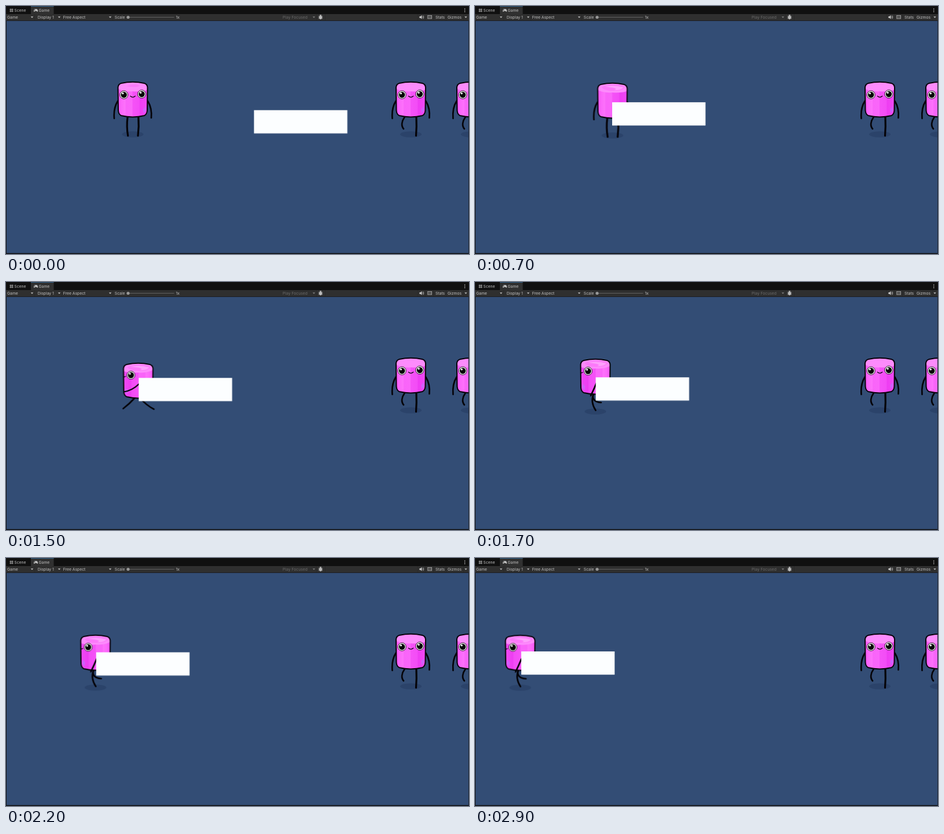
An HTML page for the animation above (3 s loop, 800 by 430 pixels).

```html
<!DOCTYPE html>
<html lang="en">
<head>
<meta charset="utf-8">
<title>Game view</title>
<style>
html, body { margin: 0; width: 100%; height: 100%; overflow: hidden; background: #101010; }
svg { display: block; }
text { font: 6.8px Inter, sans-serif; fill: #c0c0c0; }
.limb { fill: none; stroke: #050308; stroke-width: 3.2; stroke-linecap: round; stroke-linejoin: round; }
.thin { stroke-width: 2.7; }
.walker, .pose, .card { animation: 3s step-end infinite; }
.pose { visibility: hidden; }
.walker { animation-name: walk; }
.card { animation-name: follow; }
.front { animation-name: front; }
.back { animation-name: back; }
.stride { animation-name: stride; }
.pass { animation-name: pass; }

@keyframes walk {
  0% { transform: translate(219px, 131px); }
  3.32% { transform: translate(237.5px, 133px); }
  49.99% { transform: translate(228.5px, 133px); animation-timing-function: steps(4); }
  63.32% { transform: translate(187.5px, 133px); animation-timing-function: steps(6); }
  83.32% { transform: translate(121.7px, 133.2px); animation-timing-function: steps(5); }
  100% { transform: translate(67.2px, 133.4px); }
}
@keyframes follow {
  0% { transform: translate(428.5px, 180.6px); }
  3.32% { transform: translate(237px, 166.9px); }
  49.99% { transform: translate(229.4px, 166.3px); animation-timing-function: steps(4); }
  63.32% { transform: translate(187.9px, 164.3px); animation-timing-function: steps(6); }
  83.32% { transform: translate(123.8px, 162.7px); animation-timing-function: steps(5); }
  100% { transform: translate(69px, 161.8px); }
}
@keyframes front {
  0% { visibility: visible; }
  3.32%, 100% { visibility: hidden; }
}
@keyframes back {
  0%, 49.99%, 100% { visibility: hidden; }
  3.32% { visibility: visible; }
}
@keyframes stride {
  0%, 56.66%, 73.32%, 89.99%, 100% { visibility: hidden; }
  49.99%, 66.66%, 83.32% { visibility: visible; }
}
@keyframes pass {
  0%, 49.99%, 66.66%, 83.32% { visibility: hidden; }
  56.66%, 73.32%, 89.99%, 100% { visibility: visible; }
}
</style>
</head>
<body>
<svg width="800" height="430" viewBox="0 0 800 430">
  <defs>
    <linearGradient id="skin">
      <stop offset="0" stop-color="#f553f6"/>
      <stop offset=".1" stop-color="#fb66fa"/>
      <stop offset=".24" stop-color="#fd72fb"/>
      <stop offset=".27" stop-color="#f964f9"/>
      <stop offset=".48" stop-color="#fa66fa"/>
      <stop offset=".5" stop-color="#f552f7"/>
      <stop offset=".72" stop-color="#f34cf6"/>
      <stop offset=".75" stop-color="#ee3df2"/>
      <stop offset="1" stop-color="#f04af4"/>
    </linearGradient>
    <path id="shape" d="M-25.5 10Q-25 4.5-20 3Q0-1.5 20 3Q25 4.5 25.5 10L25 50Q24.5 57 20 59Q0 64-20 59Q-24.5 57-25 50Z"/>
    <clipPath id="inside"><use href="#shape"/></clipPath>
    <ellipse id="shade" cy="91.5" rx="18.5" ry="5.2" fill="#2b436a"/>
    <g id="trunk">
      <use href="#shape" fill="url(#skin)"/>
      <g clip-path="url(#inside)">
        <path d="M-26 0H26V14Q18 18 0 17Q-18 18-26 12Z" fill="#fd8bfc"/>
        <path d="M18 48L22 43L23 50L19 55Z" fill="#cf62fb"/>
      </g>
      <use href="#shape" fill="none" stroke="#08030b" stroke-width="2"/>
    </g>
    <g id="lid">
      <path d="M-19 8Q-9 3 6 3.5Q20 4 21 8Q18 14 2 14Q-14 14-19 8Z" fill="#fc79fa"/>
      <path d="M-13 7Q2 3 19 8Q16 13 3 13Q13 9-13 7Z" fill="#fda0fc"/>
    </g>
    <g id="eye">
      <circle r="7" fill="#fff" stroke="#12050f" stroke-width=".9"/>
      <circle r="5.2" fill="#040304"/>
      <circle cx="-1.8" cy="-2.4" r="1.6" fill="#fff"/>
    </g>
    <g id="face">
      <use href="#trunk"/>
      <use href="#eye" x="-15.3" y="23"/>
      <use href="#eye" x="15.5" y="21.7"/>
      <path class="limb" style="stroke-width:1.3" d="M-4 25.3Q0 29 4.2 25.2"/>
    </g>
    <g id="arms" class="limb thin">
      <path d="M-26 34Q-33.5 46-32 64"/>
      <path d="M26 34Q33.5 46 32 63"/>
    </g>
    <g id="legs" class="limb">
      <path d="M-9 62Q-11 78-8.3 94"/>
      <path d="M9.8 62Q11 78 9 94"/>
    </g>
    <g id="profile">
      <use href="#trunk" transform="matrix(-1 0 0 1 0 0)"/>
      <use href="#lid"/>
      <use href="#eye" x="-12.6" y="21.5"/>
      <path class="limb" style="stroke-width:1.3" d="M-25 24.5Q-23 25-22 23.5"/>
    </g>
    <g id="idler">
      <use href="#shade"/>
      <use href="#arms"/>
      <path class="limb thin" d="M-11 62C-16 69-17 77-12.5 82"/>
      <path class="limb" d="M9.5 62Q10.3 78 9 94"/>
      <use href="#face"/>
    </g>
    <path id="caret" d="M-2.2-1H2.2L0 1.5Z" fill="#c0c0c0"/>
  </defs>

  <rect width="800" height="430" fill="#101010"/>
  <rect x="1" y="26" width="798.5" height="402.5" fill="#334d75"/>

  <g class="walker">
    <g class="pose front">
      <use href="#shade"/>
      <use href="#arms"/>
      <use href="#legs"/>
      <use href="#face"/>
      <path d="M-11 8Q4 3 12 7Q8 11-11 8Z" fill="#fc79fa"/>
    </g>
    <g class="pose back">
      <use href="#shade"/>
      <use href="#arms"/>
      <use href="#legs"/>
      <use href="#trunk"/>
      <use href="#lid"/>
    </g>
    <g class="pose stride" transform="translate(0 7)">
      <path class="limb thin" d="M-7 62Q-15 71-26 79.5"/>
      <path class="limb thin" d="M4 62Q13 73 27 80.5"/>
      <use href="#profile"/>
      <path class="limb thin" style="stroke-width:2.2" d="M1 37Q-10 48-25 50.5"/>
    </g>
    <g class="pose pass">
      <use href="#shade"/>
      <path class="limb thin" d="M-3 61Q-9 75 .5 89.5"/>
      <path class="limb thin" d="M-4 62Q-6 75 10 76"/>
      <use href="#profile"/>
      <path class="limb thin" d="M2 42Q-3 54-8 64"/>
    </g>
  </g>

  <use href="#idler" x="699.5" y="131"/>
  <use href="#idler" x="804.5" y="131"/>
  <rect class="card" width="161.3" height="40.3" fill="#fcfeff"/>
  <path d="M799.5 26V430" stroke="#1a2230"/>

  <rect y="14" width="800" height="11" fill="#2f2f2f"/>
  <rect y="25" width="800" height="1" fill="#1b1d22"/>
  <rect x="43" width="39.5" height="14" fill="#303030"/>
  <rect x="43" width="39.5" height="1" fill="#2c5d87"/>
  <path d="M49.5 14V25M96.5 14V25M184.5 14V25M536.5 14V25M551.5 14V25M711.5 14V25M724.5 14V25M738.5 14V25M760.5 14V25M790.5 14V25" stroke="#292929" stroke-width=".8"/>
  <path d="M8 4.5V10.5M11 4.5V10.5M6.3 6H12.7M6.3 9H12.7" stroke="#b8b8b8" stroke-width=".9"/>
  <path d="M49.5 5.2H53.5Q55 6 55.2 9.5Q54 10.5 52.8 8.7H50.2Q49 10.5 47.8 9.5Q48 6 49.5 5.2Z" fill="#c4c4c4"/>
  <path d="M49.5 6V8M48.6 7H50.4" stroke="#303030" stroke-width=".6"/>
  <g fill="#c4c4c4">
    <circle cx="792.7" cy="4.7" r=".8"/><circle cx="792.7" cy="7.3" r=".8"/><circle cx="792.7" cy="9.9" r=".8"/>
  </g>
  <text x="14.3" y="9.8">Scene</text>
  <text x="56.5" y="9.8">Game</text>
  <text x="2" y="21.8">Game</text>
  <text x="54.7" y="21.8">Display 1</text>
  <text x="98.7" y="21.8">Free Aspect</text>
  <text x="187.8" y="21.8">Scale</text>
  <text x="293.5" y="21.8">1x</text>
  <text x="478" y="21.8" style="fill:#6b6b6b">Play Focused</text>
  <text x="742" y="21.8">Stats</text>
  <text x="763" y="21.8">Gizmos</text>
  <use href="#caret" x="45" y="19.3"/>
  <use href="#caret" x="92" y="19.3"/>
  <use href="#caret" x="180" y="19.3"/>
  <use href="#caret" x="532" y="19.3" opacity=".55"/>
  <use href="#caret" x="794.5" y="19.3"/>
  <path d="M209 19.5H290.5" stroke="#626262" stroke-width="1"/>
  <circle cx="211" cy="19.5" r="2.6" fill="#999"/>
  <g stroke="#bdbdbd" stroke-width=".8">
    <ellipse cx="543.5" cy="19.8" rx="2.1" ry="3" fill="#bdbdbd"/>
    <path d="M540 17.3L547 22M547 17.3L540 22M539.8 19.7H547.2M542 15.5L545 16.5M545 15.5L542 16.5" fill="none"/>
  </g>
  <path d="M714.3 18H716L718.5 16V22.6L716 20.7H714.3Z" fill="#c4c4c4"/>
  <path d="M719.8 17.5Q721 19.3 719.8 21.2M721 16.5Q722.8 19.3 721 22.2" fill="none" stroke="#c4c4c4" stroke-width=".7"/>
  <rect x="728.8" y="16.5" width="6.8" height="5.4" fill="none" stroke="#bdbdbd" stroke-width=".8"/>
  <path d="M729.8 18.3H735M729.8 20.2H735" stroke="#bdbdbd" stroke-width=".8" stroke-dasharray="1 .6"/>
</svg>
</body>
</html>
```
